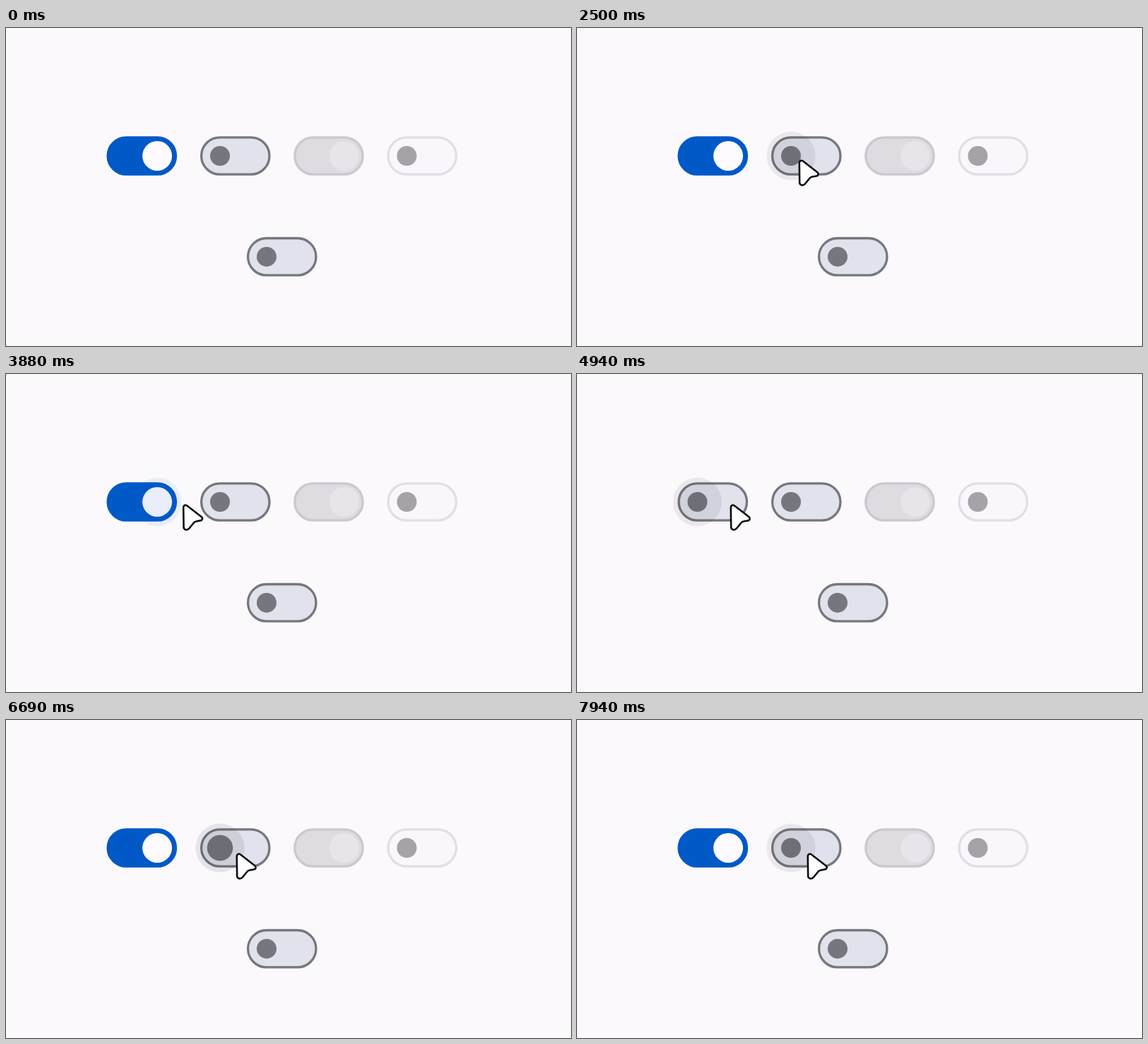
Write an HTML page that moves like this. It is 800 px wide and 450 px high and loops after 8000 ms.

```html
<!DOCTYPE html>
<html lang="en">
<head>
<meta charset="utf-8">
<title>Toggle switches</title>
<style>
html, body { margin: 0; width: 100%; height: 100%; overflow: hidden; background: #fcf9fd; }
svg { display: block; width: 800px; height: 450px; }
</style>
</head>
<body>
<svg id="stage" viewBox="0 0 800 450" xmlns="http://www.w3.org/2000/svg"></svg>
<script>
const LOOP = 8000, PRESS = 100, SLIDE = 300, TINT = 400;
const TRAVEL = 21.8;
const stage = document.getElementById('stage');

const BLUE = [0, 89, 199], TRACK = [225, 226, 236], LINE = [117, 119, 127];
const KNOB_ON = [253, 251, 255], INK = [27, 27, 31];

const clamp = v => Math.max(0, Math.min(1, v));
const lerp = (a, b, p) => a + (b - a) * p;
const mix = (a, b, p) => `rgb(${a.map((v, i) => Math.round(lerp(v, b[i], p)))})`;

function bezier(x1, y1, x2, y2) {
  const at = (a, b, u) => 3 * (1 - u) * (1 - u) * u * a + 3 * (1 - u) * u * u * b + u * u * u;
  return x => {
    if (x <= 0) return 0;
    if (x >= 1) return 1;
    let lo = 0, hi = 1;
    for (let i = 0; i < 24; i++) {
      const mid = (lo + hi) / 2;
      if (at(x1, x2, mid) < x) lo = mid; else hi = mid;
    }
    return at(y1, y2, lo);
  };
}
const glide = bezier(0.4, 0, 0.2, 1);
const outBack = bezier(0.175, 0.885, 0.32, 1.275);
const outSoft = bezier(0, 0, 0.58, 1);
const swell = bezier(0.31, 0, 0.56, 1);
const settle = bezier(0.2, 0, 0, 1);

function add(tag, attrs, parent = stage) {
  const el = document.createElementNS('http://www.w3.org/2000/svg', tag);
  set(el, attrs);
  parent.appendChild(el);
  return el;
}
function set(el, attrs) {
  for (const k in attrs) el.setAttribute(k, attrs[k]);
}

function makeSwitch(cx, cy, fill, line, knobFill, on) {
  const r = on ? 21 : 14;
  const track = add('rect', {
    x: cx - 48.2, y: cy - 26.2, width: 96.4, height: 52.4, rx: 26.2,
    fill, stroke: line, 'stroke-width': 3.3
  });
  const knob = add('rect', { fill: knobFill });
  const halo = add('circle', { cy, r: 34.5, opacity: 0 });
  const sw = { cx, cy, track, knob, halo };
  placeKnob(sw, cx + (on ? TRAVEL : -TRAVEL), r * 2, r * 2);
  return sw;
}
function placeKnob(sw, x, w, h) {
  set(sw.knob, { x: x - w / 2, y: sw.cy - h / 2, width: w, height: h, rx: Math.min(w, h) / 2 });
}

const OFF = [mix(TRACK, TRACK, 0), mix(LINE, LINE, 0), mix(LINE, LINE, 0)];
const first = makeSwitch(192.3, 181, ...OFF, true);
const second = makeSwitch(324.8, 181, ...OFF, false);
makeSwitch(457, 181, '#dedbe1', '#cbc8cf', '#e7e5ea', true);
makeSwitch(589.3, 181, '#f9f7fc', '#e1dfe5', '#a5a3a8', false);
makeSwitch(390.8, 323.7, ...OFF, false);

first.startOn = 1;
first.clicks = [4400, 5400];
first.hovers = [[1210, 2290], [3790, 6005]];
second.startOn = 0;
second.clicks = [6650, 7460];
second.hovers = [[2290, 3790], [6005, 9000]];

function drawSwitch(sw, t) {
  let from = sw.startOn, to = from, age = Infinity;
  for (const c of sw.clicks) {
    if (t >= c) { from = to; to = 1 - to; age = t - c; }
  }
  const s = clamp((age - PRESS) / SLIDE);
  const pos = lerp(from, to, outBack(s));
  const tint = lerp(from, to, outSoft(clamp((age - PRESS) / TINT)));
  const size = v => v ? 42 : 28;

  // the knob grows while held, stretches as it leaves, then rounds off
  let w, h;
  if (age < PRESS) {
    w = h = lerp(size(from), 49, age / PRESS);
  } else if (s < 0.11) {
    const p = swell(s / 0.11);
    w = lerp(49, 59.5, p);
    h = lerp(49, 38.5, p);
  } else {
    const p = settle((s - 0.11) / 0.72);
    w = lerp(59.5, size(to), p);
    h = lerp(38.5, size(to), p);
  }
  const x = sw.cx + (pos * 2 - 1) * TRAVEL;
  placeKnob(sw, x, w, h);
  set(sw.track, { fill: mix(TRACK, BLUE, tint), stroke: mix(LINE, BLUE, tint) });
  set(sw.knob, { fill: mix(LINE, KNOB_ON, clamp(pos)) });

  let hover = 0;
  for (const [a, b] of sw.hovers) {
    hover = Math.max(hover, Math.min(clamp((t - a) / 50), clamp((b + 50 - t) / 50)));
  }
  const held = age < PRESS ? age / PRESS : clamp(1 - (age - PRESS) / 100);
  set(sw.halo, {
    cx: x, fill: mix(INK, BLUE, clamp(pos)), opacity: hover * (0.08 + 0.03 * held)
  });
}

const cursor = add('path', {
  d: 'M1.3 5.2C1.3 1.4 4.6 .4 7 2.8L27 18.2C29 20 28.5 23 25.5 23.4L19.5 24.6' +
     'C17.5 25 16.3 25.8 15.2 27.5L9.5 34.5C7 37.5 2 37 1.7 33Z',
  fill: '#fff', stroke: '#0c0b10', 'stroke-width': 2.6, 'stroke-linejoin': 'round'
});

// start, end, from x, y, to x, y
const moves = [
  [690, 1520, -12, 452, 227, 186],
  [2130, 2500, 227, 186, 313.5, 186],
  [5890, 6310, 216.5, 184, 325.5, 188]
];
// time, x, y of the slow drift back to the first switch
const drift = [
  [2960, 313.5, 186], [3400, 300, 193], [3750, 268, 191], [3880, 250, 184], [4250, 216.5, 184]
];

function driftAt(t, k) {
  let i = 0;
  while (i < drift.length - 2 && t > drift[i + 1][0]) i++;
  const a = drift[i], b = drift[i + 1], span = b[0] - a[0];
  const slope = j => {
    if (j === 0 || j === drift.length - 1) return 0;
    const p = drift[j - 1], n = drift[j + 1];
    return (n[k] - p[k]) / (n[0] - p[0]);
  };
  const u = clamp((t - a[0]) / span), v = 1 - u;
  return a[k] * v * v * (1 + 2 * u) + b[k] * u * u * (3 - 2 * u) +
    span * u * v * (slope(i) * v - slope(i + 1) * u);
}

function cursorAt(t) {
  if (t >= drift[0][0] && t < moves[2][0]) return [driftAt(t, 1), driftAt(t, 2)];
  const [a, b, x0, y0, x1, y1] = moves.filter(m => t >= m[0]).pop() || moves[0];
  const p = glide((t - a) / (b - a));
  return [lerp(x0, x1, p), lerp(y0, y1, p)];
}

function draw(t) {
  drawSwitch(first, t);
  drawSwitch(second, t);
  const [x, y] = cursorAt(t);
  set(cursor, {
    transform: `translate(${x} ${y})`,
    visibility: t < moves[0][0] ? 'hidden' : 'visible'
  });
}

const begin = performance.now();
function tick() {
  draw((performance.now() - begin) % LOOP);
  requestAnimationFrame(tick);
}
tick();
</script>
</body>
</html>
```
